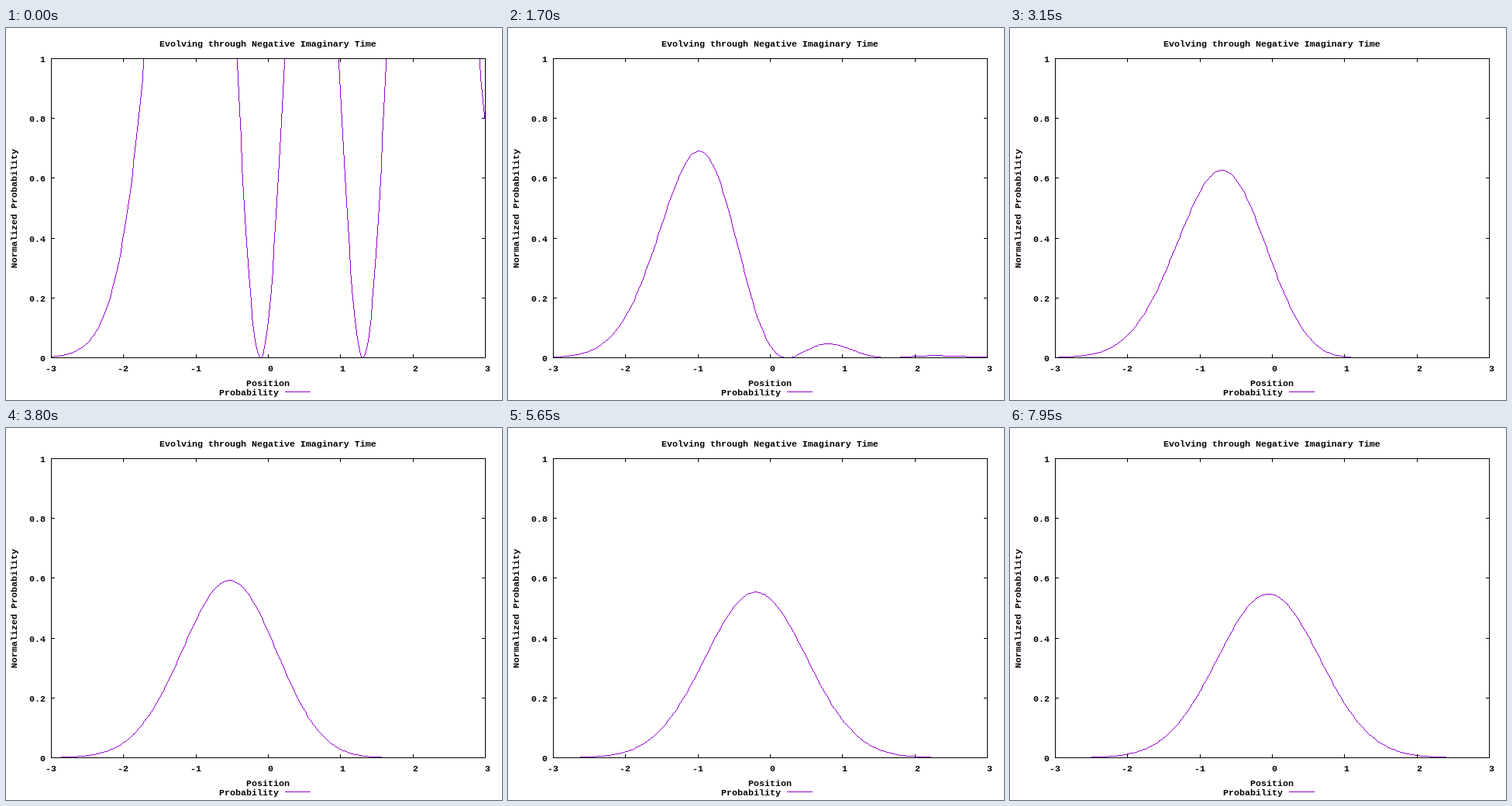
An HTML page that plays this animation: 640x480 px, repeating every 8000 ms.

```html
<!DOCTYPE html>
<html lang="en">
<head>
<meta charset="utf-8">
<title>Imaginary time evolution</title>
<style>
  html, body { margin: 0; width: 100%; height: 100%; overflow: hidden; background: #fff; }
  svg { display: block; width: 640px; height: 480px; }
  text { font: bold 11.67px "Liberation Mono", monospace; white-space: pre; }
  path { fill: none; stroke: #000; shape-rendering: crispEdges; }
  .curve { stroke: #9400d3; }
</style>
</head>
<body>
<svg viewBox="0 0 640 480">
  <path id="curve" class="curve"/>
  <path id="axes"/>
  <path class="curve" d="M360 469.5H393"/>
  <g id="labels"></g>
</svg>
<script>
const STEP_MS = 50, STEPS = 160, DTAU = 0.03, SHIFT = 0.6;
const LEFT = 58, RIGHT = 618, TOP = 39, BOTTOM = 425, CHAR = 7, TICK = 5;
const byId = id => document.getElementById(id);
const px = x => Math.round(LEFT + (x + 3) / 6 * (RIGHT - LEFT));
const py = p => Math.round(BOTTOM - p * (BOTTOM - TOP));

// Second excited oscillator state, displaced by SHIFT, after imaginary time tau.
function psi(x, tau) {
  const q = Math.exp(-tau), sum = SHIFT * (1 + q * q);
  const poly = (2 * q * x - sum) ** 2 - 2 * q * q;
  return Math.PI ** -0.25 * Math.sqrt(q) * poly *
    Math.exp(-x * x / 2 + SHIFT * q * x - SHIFT * sum / 4);
}

function norm(tau) {
  let total = 0;
  for (let i = -120; i <= 120; i++) total += psi(i / 20, tau) ** 2 / 20;
  return total;
}

// A line of whole pixels, without antialiasing, kept inside the plot.
function pixelLine(x0, y0, x1, y1) {
  const count = Math.max(Math.abs(x1 - x0), Math.abs(y1 - y0));
  let path = "";
  for (let i = 0; i <= count; i++) {
    const x = Math.round(x0 + (x1 - x0) * i / (count || 1));
    const y = Math.round(y0 + (y1 - y0) * i / (count || 1));
    if (y > TOP) path += `M${x} ${y + 0.5}h1`;
  }
  return path;
}

// Each step is scaled by the norm of the step before it; the first is unscaled.
function curvePath(step) {
  const scale = step ? norm((step - 1) * DTAU) : 1;
  const height = x => py(psi(x, step * DTAU) ** 2 / scale);
  let path = "";
  for (let i = -300; i < 300; i += 2) {
    const a = i / 100, b = a + 0.02;
    path += pixelLine(px(a), height(a), px(b), height(b));
  }
  return path;
}

function label(text, x, y, turn = 0) {
  const node = document.createElementNS("http://www.w3.org/2000/svg", "text");
  node.textContent = text;
  node.setAttribute("transform", `translate(${x} ${y}) rotate(${turn})`);
  byId("labels").append(node);
}
const centred = (text, x, y) => label(text, x - Math.floor(text.length / 2) * CHAR, y);

let axes = `M${LEFT + 0.5} ${TOP + 0.5}H${RIGHT + 0.5}V${BOTTOM + 0.5}H${LEFT + 0.5}Z`;
for (let x = -3; x <= 3; x++) {
  const tickX = px(x) + 0.5;
  axes += `M${tickX} ${TOP}v${TICK}M${tickX} ${BOTTOM + 1}v${-TICK}`;
  centred(String(x), px(x), 443);
}
for (let i = 0; i <= 5; i++) {
  const text = String(i / 5), tickY = py(i / 5) + 0.5;
  axes += `M${LEFT} ${tickY}h${TICK}M${RIGHT + 1} ${tickY}h${-TICK}`;
  label(text, 51 - text.length * CHAR, tickY + 4);
}
byId("axes").setAttribute("d", axes);

centred("Evolving through Negative Imaginary Time", 338, 24);
centred("Position", 338, 462);
label("Probability", 275, 474);
label("Normalized Probability", 14, 310, -90);

let shown = -1;
function draw(now) {
  const step = Math.floor(now / STEP_MS) % STEPS;
  if (step !== shown) byId("curve").setAttribute("d", curvePath(shown = step));
  requestAnimationFrame(draw);
}
draw(performance.now());
</script>
</body>
</html>
```
